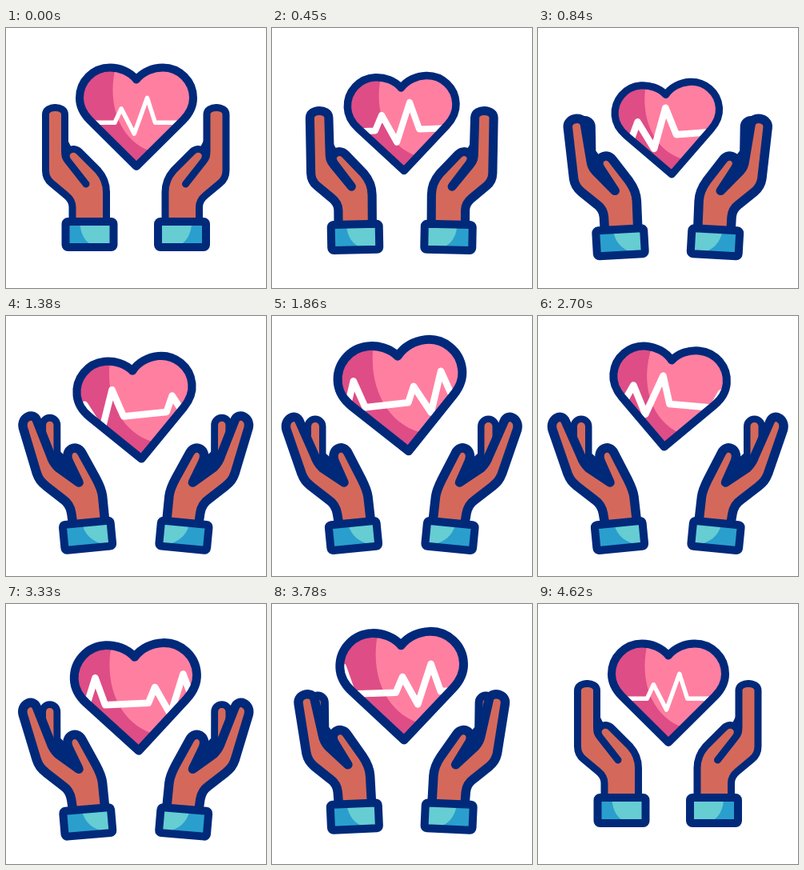
Animation of 325 by 325 pixels, one loop 5400 ms. Source, as an HTML page:

```html
<!DOCTYPE html>
<html lang="en">
<head>
<meta charset="utf-8">
<title>Caring hands</title>
<style>
html, body { margin: 0; width: 100%; height: 100%; overflow: hidden; background: #fff; }
svg { display: block; width: 100vw; height: 100vh; }
.line { fill: none; stroke: #00297a; stroke-linecap: round; stroke-linejoin: round; }
</style>
</head>
<body>
<svg viewBox="0 0 325 325">
  <defs>
    <path id="shape" d="M0-47C-8-57-21-62-33-62C-54-62-71-45-71-24C-71-12-66-4-58 4L0 61.500L58 4C66-4 71-12 71-24C71-45 54-62 33-62C21-62 8-57 0-47Z"/>
    <clipPath id="inside"><use href="#shape"/></clipPath>
  </defs>
  <g id="hand">
    <g id="arm">
      <path id="back" class="line" stroke-width="27"/>
      <path id="backSkin" class="line" style="stroke:#d4695b"/>
      <path id="palm" class="line" style="fill:#d4695b"/>
    </g>
    <g id="cuff">
      <rect x="-30" y="-16" width="60" height="32" rx="3" fill="#2a9fcd"/>
      <path id="shine" fill="#66cdd3"/>
      <rect class="line" x="-30" y="-16" width="60" height="32" rx="3" stroke-width="10"/>
    </g>
  </g>
  <use href="#hand" transform="translate(324.5) scale(-1 1)"/>
  <g id="heart">
    <g clip-path="url(#inside)">
      <use href="#shape" fill="#ff7fa1"/>
      <path d="M-24-70C-40-17-20 32 22 44V70H-80V-70Z" fill="#de4d86"/>
      <path id="pulse" fill="none" stroke="#fff" stroke-linejoin="round"/>
    </g>
    <use href="#shape" class="line" stroke-width="10"/>
  </g>
</svg>
<script>
const LOOP = 5400, MOVE = 4620, STEP = 30, BEAT = 110;
const $ = id => document.getElementById(id);
const lerp = (a, b, k) => a + (b - a) * k;
const ease = x => 0.5 - 0.5 * Math.cos(Math.PI * Math.min(1, Math.max(0, x)));
const ramp = (t, from, to) => ease((t - from) / (to - from));

// Closed and open versions of each path share the same commands.
const shapes = {
  palm: [
    'M83 250L83 224C83 217 80 213 75 209L57 194C52 190 49.5 185 49.5 178L49.5 108C49.5 96.5 73.5 96.5 73.5 108L73.5 152C73.5 160 74 162 78 167L100 195L78 167C69 156 83 146 92 155L115 178C122 186 125.5 194 125.5 205L125.5 250Z',
    'M85 268L81.5 247C80 239 77 234 71 230L49 213C43 208 40 205 37 197L18 142C14.5 128 30 120.5 34.5 132L53.5 175C56 182 59 186 63 190L90 208L78 181C73 166 89 159 95 171L112 204C116 212 119 218 120 226L124.5 266Z'
  ],
  back: ['M61 109L62 140L72 160', 'M54 138L54 178L76 198'],
  backSkin: ['M61 109L62 150', 'M54 138L54 176'],
  shine: [
    'M-12 -13C-11 0 -6 8 2 13L28 13L28 -13Z',
    'M-5 -13C-3 -1 6 9 20 13L28 13L28 -13Z'
  ]
};

function morph(id, k) {
  const [a, b] = shapes[id];
  const ends = b.match(/-?[\d.]+/g);
  let i = 0;
  $(id).setAttribute('d', a.replace(/-?[\d.]+/g, n => lerp(+n, +ends[i++], k).toFixed(2)));
}

// time, centre y, angle, scale
const keys = [
  [0, 111.5, 0, 1],
  [840, 126.5, -4.3, 0.92],
  [1860, 101.5, -6.5, 1.1],
  [2280, 91, 0, 1.1],
  [2700, 102.3, 5, 1],
  [3050, 118, 1, 1],
  [3330, 117, -2.5, 1.08],
  [3780, 103, -1.8, 1.09],
  [MOVE, 111.5, 0, 1]
];

function slope(i, c) {
  if (i < 1 || i > keys.length - 2) return 0;
  const rate = j => (keys[j + 1][c] - keys[j][c]) / (keys[j + 1][0] - keys[j][0]);
  const a = rate(i - 1), b = rate(i);
  return a * b > 0 ? 2 * a * b / (a + b) : 0;
}

// Monotone cubic through the keys
function track(t, c) {
  let i = 0;
  while (i < keys.length - 2 && t > keys[i + 1][0]) i++;
  const p = keys[i], q = keys[i + 1], d = q[0] - p[0];
  const x = (t - p[0]) / d, y = 1 - x;
  return p[c] * y * y * (1 + 2 * x) + q[c] * x * x * (3 - 2 * x)
    + d * x * y * (slope(i, c) * y - slope(i + 1, c) * x);
}

function drawHands(t, weight) {
  const fingers = ramp(t, 200, 1700) - ramp(t, 3000, 4600);
  const wrist = ramp(t, 0, 1500) - ramp(t, 2980, 4500);
  ['palm', 'back', 'backSkin'].forEach(id => morph(id, fingers));
  morph('shine', wrist);
  $('palm').setAttribute('stroke-width', lerp(9, 11.5, weight));
  $('backSkin').setAttribute('stroke-width', lerp(4, 10, fingers));
  // The arm rides on the cuff, which moves first.
  $('arm').setAttribute('transform', `translate(0 ${16 * (wrist - fingers)})`);
  $('cuff').setAttribute('transform',
    `translate(${lerp(104.5, 102, wrist)} ${lerp(258, 274.5, wrist)}) rotate(${-5.5 * wrist})`);
}

function drawHeart(t, weight) {
  const scale = track(t, 3);
  $('heart').setAttribute('transform',
    `translate(163 ${track(t, 1)}) rotate(${track(t, 2)}) scale(${scale})`);
  const shift = 15 - 2 * BEAT * ramp(t, 0, MOVE + 120);
  let d = 'M-400 7.5';
  for (let n = -1; n < 4; n++) {
    const x = shift + n * BEAT;
    d += `L${x - 45} 7.5L${x - 36} -12L${x - 18} 23L${x} -27L${x + 11} 7.5`;
  }
  // The pulse keeps its own size while the heart beats.
  $('pulse').setAttribute('d', d + 'H500');
  $('pulse').setAttribute('transform', `scale(${lerp(0.9, 1, weight) / scale})`);
  $('pulse').setAttribute('stroke-width', lerp(6, 8.5, weight));
}

function frame() {
  const now = performance.now() % LOOP;
  const t = Math.min(MOVE, Math.floor(now / STEP) * STEP);
  const weight = ramp(t, 0, 600) - ramp(t, 4020, MOVE);
  drawHands(t, weight);
  drawHeart(t, weight);
  requestAnimationFrame(frame);
}
frame();
</script>
</body>
</html>
```
